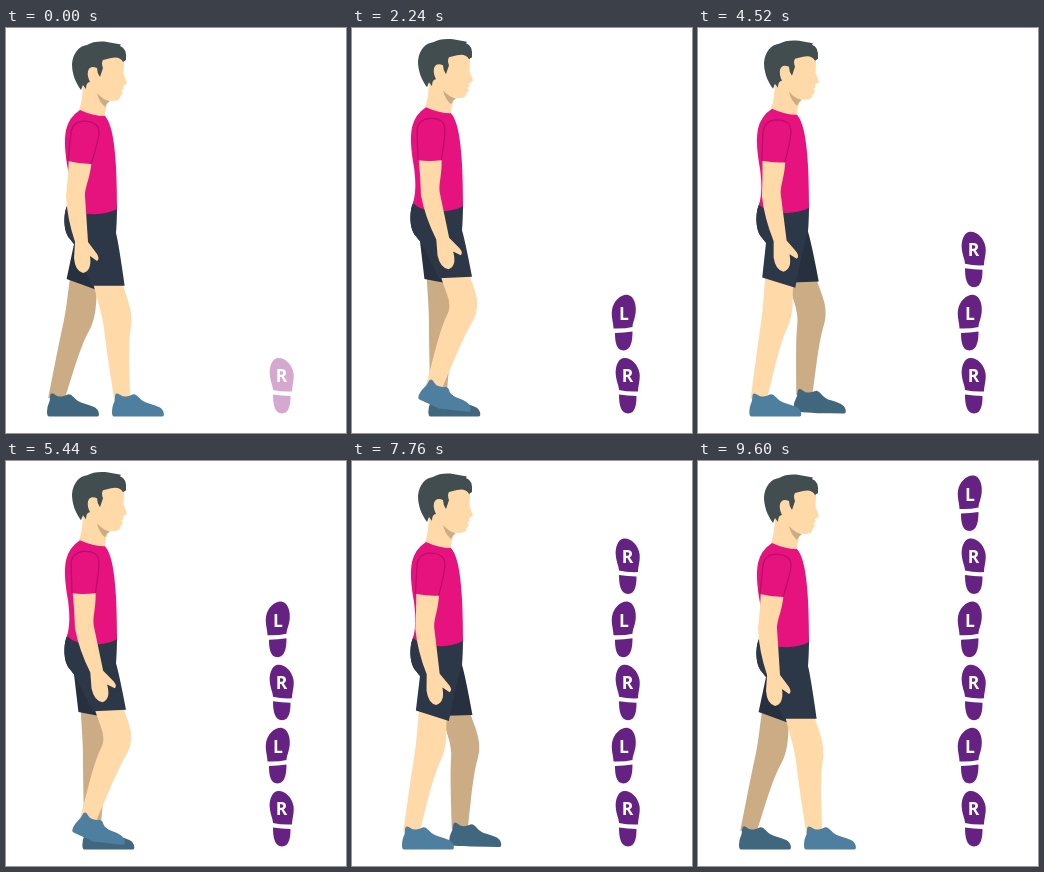
Write an HTML page with a canvas that moves like this. It is 340 px wide and 405 px high and loops after 9640 ms.

```html
<!DOCTYPE html>
<html>
<head>
<meta charset="utf-8">
<style>
html, body { margin: 0; height: 100%; overflow: hidden; background: #fff; }
canvas { display: block; }
</style>
</head>
<body>
<canvas id="stage" width="340" height="405"></canvas>
<script>
const ctx = document.getElementById('stage').getContext('2d');
const LOOP = 9640, CYCLE = 3200, STEP = CYCLE / 2;
const SKIN = '#ffd9a8', SKIN_DARK = '#cbac85', PINK = '#e6127e', HAIR = '#414d4f';
const HIP = [85, 195], GROUND = 388.5;

// One leg's cycle: time, knee x, knee y, ankle x, ankle y, heel lift in degrees
const GAIT = [
  [0, 111, 290, 116, 368, 0],
  [800, 86, 285, 79, 368, 0],
  [1360, 78, 286, 60, 368, 0],
  [1600, 73, 289, 51, 368, 0],
  [1960, 87, 284, 61, 361, 40],
  [2040, 96, 282, 66, 361, 40],
  [2240, 113, 279, 83, 356, 25],
  [2400, 120, 276, 89, 356, 10],
  [3200, 111, 290, 116, 368, 0]
];

const SHOE = [[-10, 11], [-7, 5], [-7, -2], [-4, -3], [1, 1], [8, 0], [13, -3], [21, 6], [33, 9], [41, 13],
  [42.5, 20.5], [38, 20.5], [14, 20.5], [14, 20.5], [-6, 20.5], [-10, 20.5]];

const TORSO = new Path2D('M74 82Q87 88 99 88C108 98 111 130 111 181Q100 187 84 186Q70 186 61 178C65 165 63 150 62 142C59 125 58 112 60 102Q63 89 74 82Z');
const NECK = new Path2D('M77 52Q77 72 73 82Q86 89 99 88Q99 82 103 70L92 52Z');
const NECK_SHADE = new Path2D('M91 65Q97 72 104 73Q101 75 99 79Q93 74 91 65Z');
const FACE = new Path2D('M80 36L96 24L118 26L118 35L117.5 46L121 55Q120 57 117 58L117.5 61L115.5 62.5L117 65L114.5 68Q115 73 106 73Q95 72 89 64L81 56Z');
const HAIR_SHAPE = new Path2D('M80 61L77 57L75 62C69 54 66 45 66 36C67 25 73 18 81 17C86 14 94 13 101 14L115 16.5L114 18Q121 20 120 32L117 34Q114 28 105 30L97 32Q95 35 97 40L94 49Q91 45 91 40Q84 37 82 43Q81 48 84 54Q80 54 80 61Z');
const ARM = new Path2D('M63 128L86 128C85 150 79 157 79 168L82 214L91 226Q94 231 91 233L84 228Q86 243 77 245Q69 243 68 230L69 214Q61 190 60 168Q62 150 63 128Z');
const SLEEVE = new Path2D('M62 133L65 104Q67 93 79 93Q94 94 93 106Q91 118 85 136Q74 136 62 133Z');
const SLEEVE_SEAM = new Path2D('M62 133L65 104Q67 93 79 93Q94 94 93 106Q91 118 85 136');
const SOLE = new Path2D('M-4 0C-10 1 -12.5 10 -11.7 17C-11 24 -8.5 28 -8.5 32Q0 34 10.5 33.5C10.5 28 13 22 12 15C10.5 6 3 -1 -4 0Z');
const HEEL = new Path2D('M-8.5 36.5Q0 37.5 9 38C9 46 8 55.5 0.5 55.5C-7 55.5 -8.5 46 -8.5 36.5Z');

const mix = (a, b, f) => a + (b - a) * f;
const between = (p, q, f) => [mix(p[0], q[0], f), mix(p[1], q[1], f)];
const along = (p, n, d) => [p[0] + n[0] * d, p[1] + n[1] * d];

function fill(path, colour) {
  ctx.fillStyle = colour;
  ctx.fill(path);
}

function smooth(points) {
  const path = new Path2D();
  path.moveTo(...between(points[points.length - 1], points[0], 0.5));
  points.forEach((p, i) => path.quadraticCurveTo(...p, ...between(p, points[(i + 1) % points.length], 0.5)));
  path.closePath();
  return path;
}

function rotate([x, y], degrees) {
  const a = degrees * Math.PI / 180, c = Math.cos(a), s = Math.sin(a);
  return [x * c - y * s, x * s + y * c];
}

// Unit vector pointing forward, across the limb from a to b
function normal(a, b) {
  const dx = b[0] - a[0], dy = b[1] - a[1], len = Math.hypot(dx, dy);
  return [dy / len, -dx / len];
}

function pose(time) {
  const t = time % CYCLE;
  const i = GAIT.findIndex(key => key[0] > t);
  const a = GAIT[i - 1], b = GAIT[i], f = (t - a[0]) / (b[0] - a[0]);
  const [, kx, ky, ax, ay, lift] = a.map((v, j) => mix(v, b[j], f));
  return { knee: [kx, ky], ankle: [ax, ay], lift };
}

function drawShoe(ankle, lift, colour) {
  const ball = [14, 10], pivot = rotate(ball, lift);
  const points = SHOE.map(p => {
    const q = p[0] <= ball[0]
      ? rotate(p, lift)
      : along(pivot, rotate([p[0] - ball[0], p[1] - ball[1]], lift * 0.2), 1);
    return [ankle[0] + q[0], Math.min(GROUND, ankle[1] + q[1])];
  });
  fill(smooth(points), colour);
}

function drawLeg(time, bob, skin, shoe, cloth) {
  const { knee, ankle, lift } = pose(time);
  const hip = [HIP[0], HIP[1] + bob];
  const n1 = normal(hip, knee), n2 = normal(knee, ankle);
  const bend = n1[0] * n2[1] - n1[1] * n2[0];
  const across = between(n1, n2, 0.5);
  const hem = between(hip, knee, 0.66), calf = between(knee, ankle, 0.3), low = between(knee, ankle, 1.05);
  fill(smooth([
    along(hip, n1, -13), along(hem, n1, -14), along(knee, across, -14), along(calf, n2, -12 - 5 * bend),
    along(low, n2, -8), along(low, n2, -8), along(low, n2, 8), along(low, n2, 8),
    along(calf, n2, 10), along(knee, across, 16.5), along(hem, n1, 14), along(hip, n1, 13)
  ]), skin);
  drawShoe(ankle, lift, shoe);

  const slope = 0.25 - 0.9 * (knee[0] - hip[0]) / (knee[1] - hip[1]);
  const back = along(hem, [1, slope], -16.5), front = along(hem, [1, slope], 16.5);
  const shorts = new Path2D();
  shorts.moveTo(62, 176 + bob);
  shorts.bezierCurveTo(57, 184 + bob, 57, 204 + bob, 64, 211 + bob);
  shorts.quadraticCurveTo(67, 215 + bob, 68, 216 + bob);
  shorts.lineTo(...back);
  shorts.lineTo(...front);
  shorts.quadraticCurveTo(mix(110, front[0], 0.3), 215 + bob, 110, 205 + bob);
  shorts.lineTo(111, 177 + bob);
  shorts.closePath();
  fill(shorts, cloth);
}

function drawBody(bob, swing) {
  ctx.save();
  ctx.translate(0, bob);
  fill(NECK, SKIN);
  fill(FACE, SKIN);
  fill(NECK_SHADE, SKIN_DARK);
  fill(HAIR_SHAPE, HAIR);
  fill(TORSO, PINK);
  ctx.translate(79, 105);
  ctx.rotate(-swing * Math.PI / 180);
  ctx.translate(-79, -105);
  fill(ARM, SKIN);
  fill(SLEEVE, PINK);
  ctx.strokeStyle = '#b80d68';
  ctx.lineWidth = 1.2;
  ctx.stroke(SLEEVE_SEAM);
  ctx.restore();
}

function drawPrint(index, age) {
  if (age < 0) return;
  const right = index % 2 === 0, f = Math.min(1, age / 280);
  const colour = `rgb(${mix(149, 102, f)}, ${mix(40, 34, f)}, ${mix(135, 131, f)})`;
  ctx.save();
  ctx.translate(right ? 275.5 : 272, 330 - index * 63.1);
  ctx.globalAlpha = mix(0.4, 1, f);
  ctx.save();
  if (!right) ctx.scale(-1, 1);
  fill(SOLE, colour);
  fill(HEEL, colour);
  ctx.restore();
  ctx.globalAlpha = 1;
  ctx.fillStyle = '#fff';
  ctx.fillText(right ? 'R' : 'L', 0, right ? 24 : 25);
  ctx.restore();
}

function draw(t) {
  ctx.clearRect(0, 0, 340, 405);
  const phase = t % STEP / STEP;
  const rise = 1 - Math.abs(2 * phase - 1);
  const bob = -3.4 * rise;
  drawLeg(t + STEP, bob, SKIN_DARK, '#41677f', '#26303e');
  drawLeg(t, bob, SKIN, '#4f7f9e', '#2c3747');
  drawBody(bob, 10 * rise);
  ctx.font = 'bold 17.5px "Open Sans", "Noto Sans", sans-serif';
  ctx.textAlign = 'center';
  for (let i = 0; i < 6; i++) drawPrint(i, t - i * STEP);
}

function frame() {
  draw(performance.now() % LOOP);
  requestAnimationFrame(frame);
}
frame();
</script>
</body>
</html>
```
